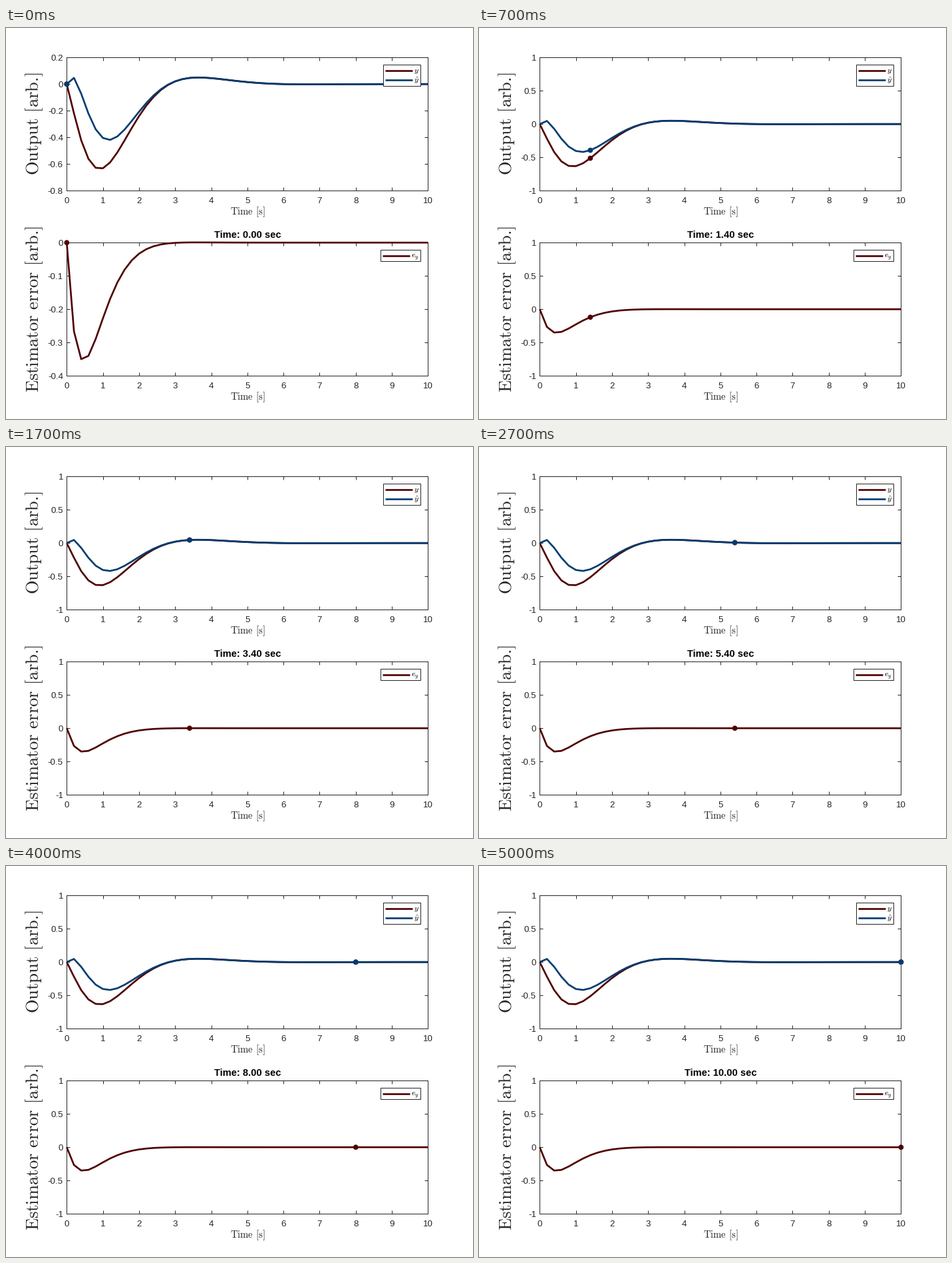
Animation of 702 by 587 pixels, one loop 5.1 s. Source, as a matplotlib script:

```python
import numpy as np
import matplotlib.pyplot as plt
from matplotlib.animation import FuncAnimation
from matplotlib.patches import Circle, Rectangle

W, H, DPI = 702, 587, 96
LEFT, RIGHT, AXES_H = 91.3, 634.4, 200
TOPS = (44.2, 322.2)
MID = (LEFT + RIGHT) / 2
MAROON, NAVY, GREY = "#500000", "#003c71", "#262626"
THIN, THICK = 0.75, 2

plt.rcParams.update({
    "font.family": "Liberation Sans",
    "font.size": 10,
    "mathtext.fontset": "cm",
    "axes.unicode_minus": False,
    "axes.linewidth": THIN,
    "axes.edgecolor": GREY,
})

# Controller poles at -1 +- i, estimator poles at -2 +- i
t = np.linspace(0, 10, 51)
slow, fast = np.exp(-t), np.exp(-2 * t)
output = (fast * (0.8 * np.cos(t) + 2.4 * np.sin(t))
          - slow * (0.8 * np.cos(t) + 2.6 * np.sin(t)))
error = -2 * fast * np.sin(t)
estimate = output - error

fig = plt.figure(figsize=(W / DPI, H / DPI), dpi=DPI, facecolor="white")


def make_axes(top):
    ax = fig.add_axes([LEFT / W, 1 - (top + AXES_H) / H,
                       (RIGHT - LEFT) / W, AXES_H / H])
    ax.set_xlim(0, 10)
    ax.set_xticks(range(11))
    ax.tick_params(direction="in", top=True, right=True, length=4,
                   width=THIN, color=GREY, labelcolor=GREY)
    ax.tick_params(axis="x", pad=7.2)
    ax.tick_params(axis="y", pad=4)
    return ax


def set_scale(ax, low, high, step):
    ticks = np.round(np.arange(low, high + step / 2, step), 2) + 0.0
    ax.set_ylim(low, high)
    ax.set_yticks(ticks, [f"{v:g}" for v in ticks])


top_ax, bottom_ax = (make_axes(top) for top in TOPS)

# Pixel-space layer for dots, labels and legends
layer = fig.add_axes([0, 0, 1, 1], zorder=5)
layer.set(xlim=(0, W), ylim=(H, 0))
layer.axis("off")


def add_curve(ax, values, color):
    """Draw a curve and return it with the dot that travels along it."""
    ax.plot(t, values, color=color, lw=THICK, solid_capstyle="butt",
            clip_on=False, zorder=3)
    dot = layer.add_patch(Circle((0, 0), 3.9, fc=color, lw=0))
    return ax, values, dot


curves = [add_curve(top_ax, output, MAROON),
          add_curve(top_ax, estimate, NAVY),
          add_curve(bottom_ax, error, MAROON)]


def roman(text):
    """Upright math text with plain word spaces and full stops."""
    body = text.replace(".", r".\hspace{-0.2}")
    body = body.replace(" ", r"\hspace{0.38}")
    return rf"$\mathrm{{{body}}}$"


def label(x, y, text, size, color=GREY, **kw):
    kw = {"ha": "center", "va": "baseline", **kw}
    return layer.text(x, y, text, fontsize=size, color=color, **kw)


def legend(x, y, w, h, entries):
    layer.add_patch(Rectangle((x, y), w, h, fc="white", ec=GREY, lw=THIN))
    for row, base, color, text in entries:
        layer.plot([x + 3, x + 43.5], [row, row], color=color, lw=THICK,
                   solid_capstyle="butt")
        label(x + 46, base, text, 9, "black", ha="left")


for top, name in zip(TOPS, ("Output [arb.]", "Estimator error [arb.]")):
    label(MID, top + 235.8, roman("Time [s]"), 11)
    label(49.5, top + AXES_H / 2, roman(name), 20,
          rotation=90, rotation_mode="anchor")

legend(567.2, 55.2, 56, 32, [(64.2, 67, MAROON, "$y$"),
                             (78.2, 81.5, NAVY, r"$\hat{y}$")])
legend(563.2, 333.2, 60, 17, [(342.2, 345, MAROON, "$e_y$")])
title = label(MID, 315, "", 11, "black", weight="bold")


def draw(i):
    if i == 0:
        set_scale(top_ax, -0.8, 0.2, 0.2)
        set_scale(bottom_ax, -0.4, 0, 0.1)
    else:
        for ax in (top_ax, bottom_ax):
            set_scale(ax, -1, 1, 0.5)
    to_pixels = layer.transData.inverted()
    for ax, values, dot in curves:
        dot.center = to_pixels.transform(
            ax.transData.transform((t[i], values[i])))
    title.set_text(f"Time: {t[i]:.2f} sec")
    return [dot for *_, dot in curves] + [title]


anim = FuncAnimation(fig, draw, frames=len(t), interval=100, repeat=True)
plt.show()
```
